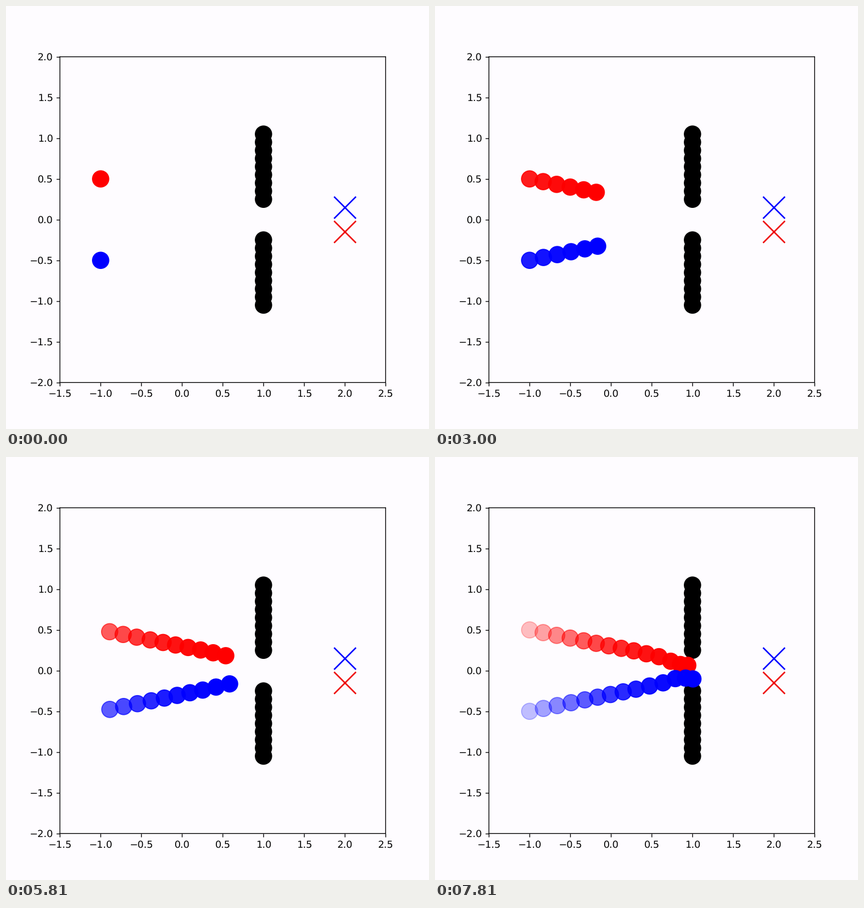
These frames come from a looping animation (748x748 px, 8 s). A matplotlib script:

```python
import numpy as np
import matplotlib.pyplot as plt
from matplotlib.animation import FuncAnimation
from matplotlib.patches import Circle

SIZE = 748
FRAMES = 40
GAP = 3          # frames between two dots of a trail
FADE = 45        # age at which a dot would vanish
RADIUS = 0.1
BACK = "#fefcff"

# Each agent heads for the gap in the wall and brakes as it gets there
KEYS = [0, 12, 24, 30, 33, 36, 39]
PATHS = {
    "red": ([-1, -.336, .279, .588, .733, .851, .942],
            [.5, .366, .243, .171, .115, .075, .065]),
    "blue": ([-1, -.322, .306, .639, .789, .915, 1.005],
             [-.5, -.359, -.228, -.150, -.098, -.092, -.102]),
}
GOALS = [(-0.15, "#ee0404"), (0.15, "blue")]

plt.rcParams.update({"font.family": "DejaVu Sans", "text.hinting": "none"})
fig, ax = plt.subplots(figsize=(6, 6), dpi=SIZE / 6, facecolor=BACK)
ax.set_facecolor(BACK)
ax.set_aspect("equal")
ax.set_xlim(-1.5, 2.5)
ax.set_ylim(-2, 2)
ax.set_xticks(np.arange(-1.5, 2.6, 0.5))
ax.set_yticks(np.arange(-2, 2.1, 0.5))
for spine in ax.spines.values():
    spine.set_snap(False)


def add_dot(x, y, color, z):
    return ax.add_patch(Circle((x, y), RADIUS, color=color, zorder=z))


for k in range(9):
    for side in (1, -1):
        add_dot(1, side * (0.25 + 0.1 * k), "black", 1)

for y, color in GOALS:
    ax.scatter(2, y, s=500, marker="x", color=color, linewidths=1.5)

# The newest dot of a trail lies on top
count = (FRAMES - 1) // GAP + 1
trails = {
    color: [add_dot(-1, 0, color, 3 + z + 0.01 * k) for k in range(count)]
    for z, color in enumerate(PATHS)
}


def position(color, frame):
    return [np.interp(frame, KEYS, values) for values in PATHS[color]]


def draw(frame):
    times = range(frame % GAP, frame + 1, GAP)
    for color, dots in trails.items():
        for dot in dots:
            dot.set_visible(False)
        for dot, t in zip(dots, times):
            dot.center = position(color, t)
            dot.set_alpha(1 - ((frame - t) / FADE) ** 2)
            dot.set_visible(True)
    return [dot for dots in trails.values() for dot in dots]


anim = FuncAnimation(fig, draw, frames=FRAMES, interval=200,
                     init_func=lambda: draw(0), repeat=True, blit=False)
plt.show()
```
